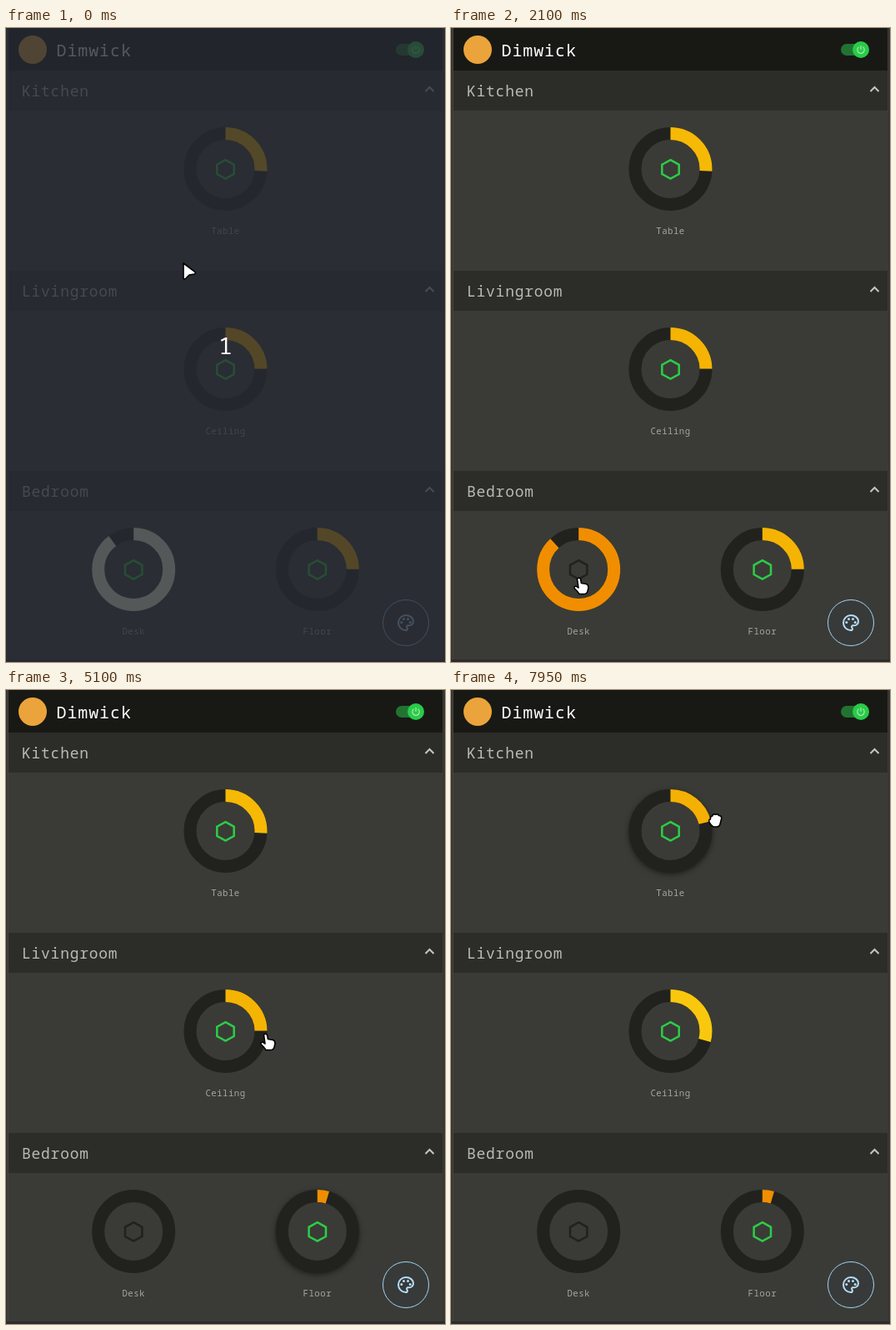
An HTML page that plays this animation: 527x760 px, repeating every 8000 ms.

```html
<!DOCTYPE html>
<html lang="en">
<head>
<meta charset="utf-8">
<title>Lamp dashboard</title>
<style>
  html, body { margin: 0; width: 100%; height: 100%; overflow: hidden; background: #3a3b36; }
  svg { display: block; width: 527px; height: 760px; }
  text { font-family: "Noto Sans Mono", monospace; letter-spacing: .045em; }
  .title { font-size: 20px; fill: #fff; }
  .room { font-size: 17.9px; fill: #b9bab5; }
  .name { font-size: 10.7px; fill: #a5a6a1; text-anchor: middle; }
  .count { font-size: 28px; fill: #fff; text-anchor: middle; letter-spacing: 0; }
  .line { fill: none; stroke-width: 2; }
  .ring { fill: #3a3b36; stroke: #21221e; stroke-width: 15; }
  .arc { fill: none; stroke-width: 15; }
  .hex { fill: none; stroke-width: 2.5; }
  .shadow { filter: drop-shadow(0 2px 3px rgba(0, 0, 0, .5)); }
  #cursor path { fill: #fff; stroke: #000; stroke-width: 1.6; stroke-linejoin: round; }
</style>
</head>
<body>
<svg viewBox="0 0 527 760">
  <rect width="527" height="760" fill="#3a3b36"/>
  <rect x="3" width="521" height="51" fill="#181914"/>
  <circle cx="32" cy="26" r="17" fill="#eba43b"/>
  <text class="title" x="60.5" y="34">Dimwick</text>

  <rect x="468" y="19" width="33" height="14" rx="7" fill="#227332"/>
  <circle cx="492" cy="26" r="10" fill="#2acb48"/>
  <path d="M489.5 22.8a4.2 4.2 0 1 0 5 0M492 21v5" fill="none" stroke="#a5eab0" stroke-width="1.2"/>

  <g id="rooms"></g>
  <g id="lamps"></g>

  <circle cx="480" cy="713" r="27.5" fill="#373a39" stroke="#a5d3f5"/>
  <g transform="translate(468 701)" fill="#b5dcfa">
    <path class="line" stroke="#b5dcfa" d="M12 3a9 9 0 1 0 0 18c1.2 0 1.9-.8 1.9-1.8 0-.6-.2-1-.6-1.5-.8-1 0-2.4 1.1-2.4H16a5 5 0 0 0 5-5c0-4-4-7.3-9-7.3z"/>
    <circle cx="6.8" cy="11.5" r="1.5"/><circle cx="9.5" cy="7.5" r="1.5"/>
    <circle cx="14.5" cy="7.5" r="1.5"/><circle cx="17.2" cy="11.5" r="1.5"/>
  </g>

  <path d="M.5 0V757M525.5 0V757" stroke="#32332f"/>
  <path d="M2.5 0V757" stroke="#42433e"/>
  <rect y="757" width="527" height="3" fill="#302a2e"/>

  <g id="intro">
    <rect width="527" height="760" fill="#262a33" fill-opacity=".78"/>
    <text class="count" x="263.5" y="391">1</text>
  </g>
  <g id="cursor">
    <path d="M0 0V17.5Q.5 20 3 18L7 14L13 13Q15.500 12.200 13.500 10.200Z"/>
    <path d="M-2.5 1.5Q-.5-1 1.5 1.5L2.5 6.5L8.5 7.5Q11 8.5 11 12L10 16Q9.5 19.5 5 19.5H0Q-1.5 17-6 12.5Q-6.5 9.5-3 10.5L-1 12Z"/>
    <path d="M-5.5-1Q-6-4.5-3-5Q-2.5-8 .5-6.8Q3.5-8 4.5-5.5Q8-5.5 7.8-2L6 5Q5.500 8 2 8H-2Q-4.5 7-7 2.5Q-8-1-5.5-1Z"/>
  </g>
</svg>
<script>
const LOOP = 8000, STEP = 50;
const GREEN = [45, 204, 72], OFF = [33, 34, 30];
const ORANGE = [241, 142, 0], AMBER = [245, 180, 4], YELLOW = [249, 200, 14], CREAM = [255, 255, 228];
const ARROW = 0, HAND = 1, FIST = 2;

const $ = id => document.getElementById(id);
const progress = (t, start, end) => Math.max(0, Math.min(1, (t - start) / (end - start)));
const mix = (a, b, p) => a + (b - a) * p;
const blend = (a, b, p) => a.map((v, i) => mix(v, b[i], p));
const rgb = color => `rgb(${color.map(Math.round)})`;
const cubic = p => p < .5 ? 4 * p ** 3 : 1 - (2 - 2 * p) ** 3 / 2;

// Levels are percentages; a lamp is held from grab to release.
const table = { name: "Table", x: 263.5, y: 169, from: 25.9, to: 21.2, grab: 7650, release: 7950 };
const ceiling = { name: "Ceiling", x: 263.5, y: 409, from: 24.8, to: 29.2, grab: 5450, release: 6200 };
const desk = { name: "Desk", x: 153.2, y: 649, from: 89.8, to: 0, click: 1550 };
const floor = { name: "Floor", x: 373.8, y: 649, from: 24.9, to: 4.6, grab: 3250, release: 4550 };
const lamps = [table, ceiling, desk, floor];
const dragged = [floor, ceiling, table];

$("rooms").innerHTML = ["Kitchen", "Livingroom", "Bedroom"].map((room, i) => `
  <g transform="translate(0 ${51 + 240 * i})">
    <rect x="3" width="521" height="48" fill="#2c2d29"/>
    <text class="room" x="19" y="31">${room}</text>
    <path class="line" stroke="#c5c6c1" d="M503.5 25l5-5 5 5"/>
  </g>`).join("");

$("lamps").innerHTML = lamps.map(({ name, x, y }) => `
  <g transform="translate(${x} ${y})">
    <circle class="ring" r="42.5"/>
    <circle class="arc" r="42.5" pathLength="100" transform="rotate(-90)"/>
    <path class="hex" d="M0-10.800L10.200-5.200V6L0 11.600L-10.200 6V-5.200Z"/>
    <text class="name" x="0" y="78">${name}</text>
  </g>`).join("");

lamps.forEach((lamp, i) => {
  [lamp.ring, lamp.arc, lamp.hex] = $("lamps").children[i].children;
});

function levelAt(lamp, t) {
  const p = lamp === desk
    ? cubic(progress(t, desk.click + 490, desk.click + 850))
    : progress(t, mix(lamp.grab, lamp.release, .2), lamp.release);
  return mix(lamp.from, lamp.to, p);
}

function warmth(level) {
  if (level < 23) return blend(ORANGE, AMBER, progress(level, 5, 23));
  if (level < 30) return blend(AMBER, YELLOW, progress(level, 25, 29));
  return blend(YELLOW, CREAM, progress(level, 30, 90));
}

// The holding hand follows the end of the lamp's arc.
function grip(lamp, t) {
  const angle = levelAt(lamp, t) / 50 * Math.PI;
  return [lamp.x + 55 * Math.sin(angle), lamp.y - 55 * Math.cos(angle)];
}

const move = (start, end, x, y) => ({ start, end, target: () => [x, y] });
const drag = lamp => ({ start: lamp.grab, end: lamp.grab + 100, target: t => grip(lamp, t) });
const gestures = [
  move(350, 600, 194, 325),
  move(700, 1150, 134, 610),
  move(1150, 1550, 154, 659),
  move(2400, 2750, 240, 694),
  move(2750, 3050, 405, 663),
  drag(floor),
  move(4900, 5100, 312, 412),
  move(5200, 5250, 305, 385),
  drag(ceiling),
  move(6350, 6850, 357, 187),
  move(6950, 7150, 306, 173),
  drag(table)
];

function cursorAt(t) {
  return gestures.filter(g => t >= g.start).reduce(
    (pos, g) => blend(pos, g.target(t), progress(t, g.start, g.end)), [213, 282]);
}

function cursorKind([x, y], t) {
  if (dragged.some(lamp => t > lamp.grab && t <= lamp.release + 100)) return FIST;
  return lamps.some(lamp => Math.hypot(x - lamp.x, y - lamp.y) < 50) ? HAND : ARROW;
}

function drawLamp(lamp, t, active) {
  const level = levelAt(lamp, t);
  const off = lamp === desk ? progress(t, desk.click, desk.click + 500) : 0;
  lamp.arc.setAttribute("stroke-dasharray", `${level} 200`);
  lamp.arc.style.visibility = level > 0 ? "visible" : "hidden";
  lamp.arc.setAttribute("stroke", rgb(warmth(level * (1 - off))));
  lamp.hex.setAttribute("stroke", rgb(blend(GREEN, OFF, off)));
  lamp.ring.classList.toggle("shadow", lamp === active);
}

function draw(t) {
  const active = dragged.filter(lamp => t >= lamp.grab).pop();
  lamps.forEach(lamp => drawLamp(lamp, t, active));
  $("intro").setAttribute("opacity", 1 - progress(t, 300, 600));

  const pos = cursorAt(t), kind = cursorKind(pos, t);
  $("cursor").setAttribute("transform", `translate(${pos})`);
  [...$("cursor").children].forEach((shape, i) => {
    shape.style.display = i === kind ? "" : "none";
  });
}

const start = performance.now();
function tick() {
  const t = (performance.now() - start) % LOOP;
  draw(Math.floor(t / STEP) * STEP);
  requestAnimationFrame(tick);
}
tick();
</script>
</body>
</html>
```
